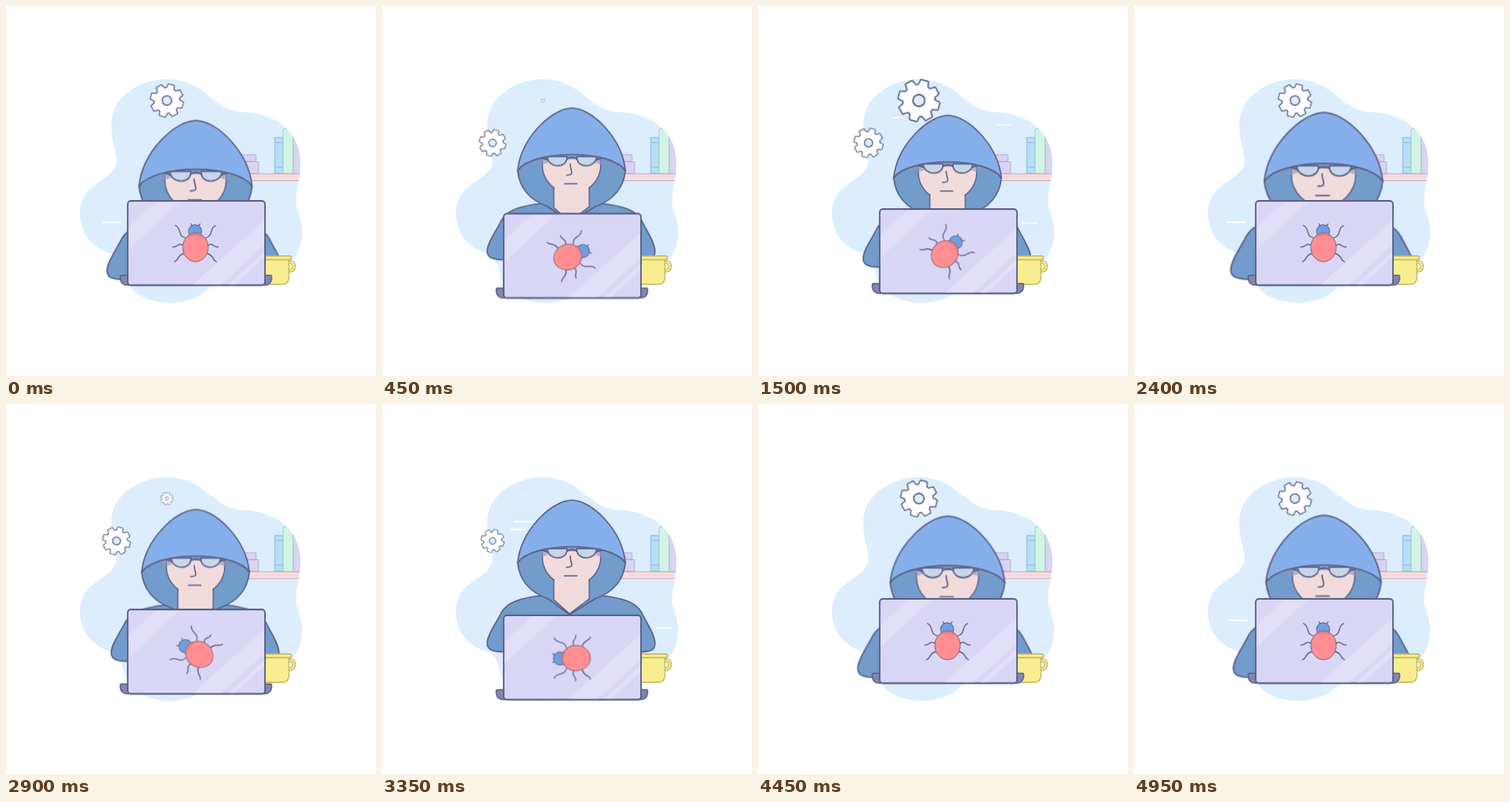
These frames come from a looping animation (450x450 px, 5 s). An HTML page without scripts:

```html
<!DOCTYPE html>
<html lang="en">
<head>
<meta charset="utf-8">
<title>Hooded figure at a laptop</title>
<style>
  html, body { margin: 0; width: 100%; height: 100%; overflow: hidden; background: #fff; }
  svg { display: block; width: 100vw; height: 100vh; }

  .line { fill: none; stroke: #5a5f88; stroke-width: 1.6; stroke-linecap: round; stroke-linejoin: round; }
  .thin { stroke-width: 1.3; }
  .skin { fill: #f2dcdb; }
  .cloth { fill: #719ccb; }
  .hood { fill: #86b0eb; }
  .streak { fill: none; stroke: #fff; stroke-width: 2; stroke-linecap: round; }

  /* One lean in and out takes 2.5 s; the bug alternates sides over two. */
  .laptop, .figure, .lean, .big, .small, .streak {
    animation: 2.5s cubic-bezier(.3, 0, .7, 1) infinite;
  }
  .laptop { animation-name: lower; }
  .figure { animation-name: rise; }
  .lean { animation-name: lean; animation-timing-function: linear; transform-origin: 231px 345px; }
  .big { animation-name: big; }
  .small { animation-name: small; }
  .bug { animation: turn 5s cubic-bezier(.3, 0, .7, 1) infinite; transform-origin: 231px 288.5px; }
  .near { animation-name: near; animation-timing-function: linear; }
  .far { animation-name: far; }
  .mid { animation-name: mid; }

  @keyframes lower {
    0%, 4%, 74%, 100% { transform: translateY(0); }
    24%, 46% { transform: translateY(20px); }
  }
  @keyframes rise {
    0%, 4%, 74%, 100% { transform: translateY(32px); }
    24%, 46% { transform: translateY(0); }
  }
  @keyframes lean {
    0% { transform: scale(1.05); }
    3% { transform: scale(1.02); }
    7%, 70% { transform: scale(1); }
    80% { transform: scale(1.08); }
    88% { transform: scale(1.13); }
    93% { transform: scale(1.125); }
    96% { transform: scale(1.1); }
    98% { transform: scale(1.07); }
    100% { transform: scale(1.05); }
  }
  @keyframes big {
    0%, 2%, 84%, 100% { transform: scale(1); }
    9%, 54%, 70% { transform: scale(1.26); }
    20%, 46% { transform: scale(0); }
  }
  @keyframes small {
    0%, 4%, 74%, 100% { transform: scale(0); }
    12%, 54%, 62% { transform: scale(.88); }
    26%, 46% { transform: scale(.69); }
  }
  @keyframes turn {
    0%, 2%, 37%, 52%, 87%, 100% { transform: rotate(0); }
    12%, 23% { transform: rotate(90deg); }
    62%, 73% { transform: rotate(-90deg); }
  }
  @keyframes near {
    0% { transform: translateX(0); opacity: 1; }
    6% { transform: translateX(8px); opacity: 0; }
    80% { transform: translateX(-22px); opacity: 0; }
    90% { opacity: 1; }
    100% { transform: translateX(0); opacity: 1; }
  }
  @keyframes far {
    0%, 20% { transform: translateX(-12px); opacity: 0; }
    30% { opacity: .9; }
    34% { transform: translateX(0); opacity: .9; }
    48%, 100% { transform: translateX(10px); opacity: 0; }
  }
  @keyframes mid {
    0%, 50%, 70%, 100% { opacity: 0; }
    57%, 61% { opacity: .7; }
  }
</style>
</head>
<body>
<svg viewBox="0 0 450 450">
  <defs>
    <path id="blob" d="M128 146C127 112 160 89 197 89C244 90 250 127 287 129C328 130 358 153 358 191C358 214 350 230 354 247C366 277 360 298 344 314C316 337 264 327 245 345C232 357 214 361 198 361C169 360 150 349 143 326C141 309 135 303 121 299C101 290 90 274 90 252C91 211 134 214 134 188C134 173 128 164 128 146Z"/>
    <clipPath id="inside"><use href="#blob"/></clipPath>
    <clipPath id="screen"><rect x="149" y="238" width="165" height="101" rx="3"/></clipPath>

    <path id="tooth" d="M-4.6 -13L-3.3 -19.5H3.3L4.6 -13Z"/>
    <g id="teeth"><use href="#tooth"/><use href="#tooth" transform="rotate(90)"/><use href="#tooth" transform="rotate(180)"/><use href="#tooth" transform="rotate(270)"/></g>
    <g id="cog"><circle r="15"/><use href="#teeth"/><use href="#teeth" transform="rotate(45)"/></g>
    <g id="gear" transform="rotate(16)">
      <use href="#cog" fill="#5a5f88" stroke="#5a5f88" stroke-width="2.6" stroke-linejoin="round"/>
      <use href="#cog" fill="#fff"/>
      <circle r="5.700" fill="#dceefd" stroke="#5a5f88" stroke-width="1.500"/>
    </g>

    <path id="legs" d="M218 282C208 279 214 270 206 267M215 291C209 287 209 294 203 293M217 301C207 303 211 309 205 311"/>
    <path id="hoodFront" d="M165 193C169 153 207 117 231 117C255 117 292 153 296 193C279 167 183 167 165 193Z"/>
    <path id="lens" d="M201 176H225C226 191 202 191 201 176Z"/>
  </defs>

  <use href="#blob" fill="#dceefd"/>

  <!-- Shelf and books -->
  <g clip-path="url(#inside)" stroke-width="1">
    <rect x="270" y="204" width="92" height="8.500" fill="#f4dcdd" stroke="#c9acc0"/>
    <g fill="#d9d4f3" stroke="#b3add8">
      <rect x="281" y="181" width="23" height="8"/>
      <rect x="284" y="189.500" width="23" height="14"/>
      <path d="M349 153L360 151V204H349Z"/>
    </g>
    <rect x="327" y="160" width="10" height="43.500" fill="#b9def8" stroke="#8ab8df"/>
    <path d="M328 166H336M328 196H336" stroke="#8ab8df"/>
    <path d="M337 150L349 148V203.500H337Z" fill="#d3f3e4" stroke="#a3d3c5"/>
  </g>

  <!-- Moving highlights -->
  <path class="streak near" d="M118 263H139"/>
  <path class="streak far" d="M161 143H185M157 152.500H173M334 272.500H351"/>
  <path class="streak mid" d="M163 136H174M291 144.500H307M322 264H340"/>

  <g transform="translate(195.700 115)"><g class="big"><use href="#gear"/></g></g>
  <g transform="translate(134.500 166.500)"><g class="small"><use href="#gear"/></g></g>

  <!-- Hooded figure -->
  <g class="lean"><g class="figure">
    <path class="line cloth" d="M194 233C168 236 152 241 145 254C138 268 128 281 128 291C128 299 134 301.500 150 301.500H312C328 301.500 332 299 332 291C332 281 323 268 316 254C309 241 293 236 267 233Z"/>
    <path class="line cloth" d="M165 193C167 214 180 229 202 237L228 256L259 237C281 229 294 214 296 193C279 160 183 160 165 193Z"/>
    <path class="line thin skin" d="M209 208V238L228 255L252 237V208Z"/>
    <path class="line thin skin" d="M195 178V186A35.500 35 0 0 0 266 186V178Z"/>
    <path class="skin" d="M210 210H251V226H210Z"/>
    <path d="M184 184C200 171 262 171 278 184L266 186C246 177 215 177 195 186Z" fill="#8d98bc" opacity=".6"/>
    <g class="line">
      <use href="#lens" fill="#c8d6e9"/>
      <use href="#lens" fill="#c8d6e9" transform="matrix(-1 0 0 1 462 0)"/>
      <path d="M225 179Q231 175 237 179M195 178L201 180M267 178L261 180"/>
      <path d="M229 185C228 191 236 199 224.500 198.500M222 209H237"/>
    </g>
    <use href="#hoodFront" class="line hood"/>
    <path d="M228 256V262" class="line"/>
  </g></g>

  <!-- Cup -->
  <g fill="#f8ee8f" stroke="#c2b45c" stroke-width="1.300">
    <path d="M344 312C352.500 310 352.500 323 344 322" fill="none" stroke-width="4.500"/>
    <path d="M344 312C352.500 310 352.500 323 344 322" fill="none" stroke="#f8ee8f" stroke-width="2.100"/>
    <path d="M306 308H344V330Q344 338.500 336 338.500H306Z"/>
    <rect x="304" y="304" width="43" height="4.500" rx="2"/>
  </g>

  <!-- Laptop -->
  <g class="laptop">
    <path d="M139 329Q139 327.500 141 327.500H322Q323 327.500 323 329V332Q322 339.500 314 339.500H148Q140 339.500 139 332Z" fill="#8386ad" stroke="#5a5f88" stroke-width="1.500"/>
    <rect x="148" y="237" width="167" height="102.500" rx="4" fill="#dad7f6" stroke="#5a5f88" stroke-width="1.800"/>
    <path clip-path="url(#screen)" fill="#fff" opacity=".22" d="M148 270L184 237H212L148 297ZM226 340L315 260V290L261 340ZM269 340L315 298V305L277 340Z"/>
    <g class="bug">
      <g class="line thin">
        <use href="#legs"/>
        <use href="#legs" transform="matrix(-1 0 0 1 461 0)"/>
        <path d="M227 268L225 265M234 268L236 265"/>
      </g>
      <circle cx="230" cy="274" r="8" fill="#6f9fe0" stroke="#5a5f88"/>
      <ellipse cx="230.500" cy="293.500" rx="15.500" ry="17.500" fill="#ff8f92" stroke="#85647f"/>
      <path d="M217 286C221 274 240 274 244 286C238 277 223 277 217 286Z" fill="#d9727f" opacity=".6"/>
    </g>
  </g>
</svg>
</body>
</html>
```
